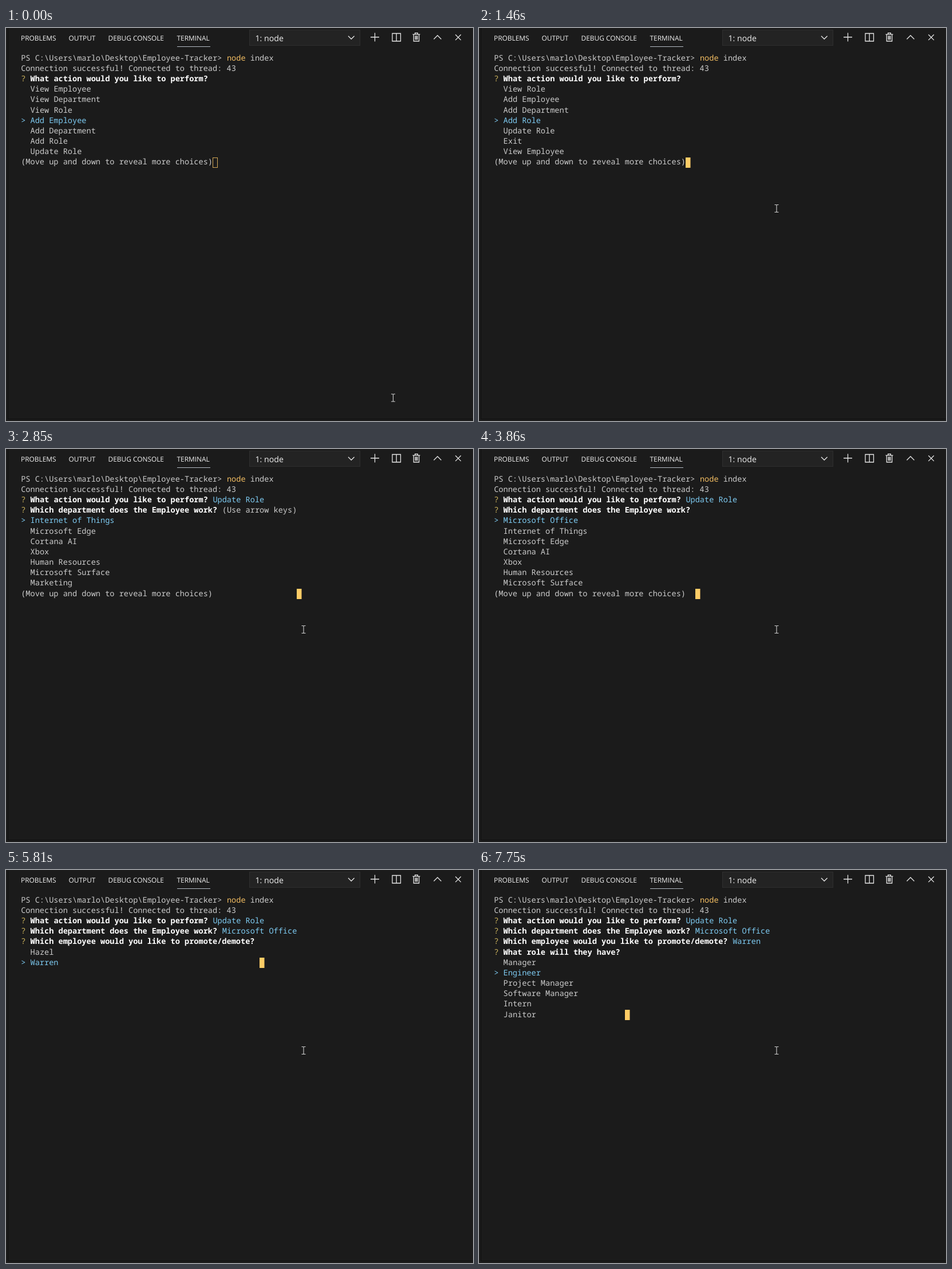
Animation of 816x686 px, one loop 8 s. Source, as an HTML page:

```html
<!DOCTYPE html>
<html lang="en">
<head>
<meta charset="utf-8">
<title>Terminal menu</title>
<style>
  html, body { margin: 0; width: 100%; height: 100%; overflow: hidden; background: #1b1b1b; }
  svg { display: block; width: 816px; height: 686px; }
  text { text-rendering: geometricPrecision; white-space: pre; }
  .tabs { font: 11.9px "Open Sans", "Noto Sans", sans-serif; fill: #f2f2f2; }
  .pick { font: 14.2px "Open Sans", "Noto Sans", sans-serif; fill: #f0f0f0; }
  .icons { fill: none; stroke: #e6e6e6; stroke-width: 1.3; }
  .term { font: 13.625px "Noto Sans Mono", "DejaVu Sans Mono", monospace; fill: #cccccc; }
  .bold { font-weight: 700; fill: #ffffff; }
  .cyan { fill: #7ecbf2; }
  .mark { fill: #cdb45c; }
  .cmd { fill: #f2bd62; }
</style>
</head>
<body>
<svg viewBox="0 0 816 686">
  <rect width="816" height="686" fill="#1b1b1b"/>
  <path d="M3.5 0V682.5H816" fill="none" stroke="#101010"/>
  <g class="tabs">
    <text x="26" y="21.5">PROBLEMS</text>
    <text x="109.5" y="21.5">OUTPUT</text>
    <text x="178.5" y="21.5">DEBUG CONSOLE</text>
    <text x="298.5" y="21.5">TERMINAL</text>
  </g>
  <path d="M299 32.5H357" stroke="#b4bcc4"/>
  <rect x="425.5" y="3.5" width="193" height="27" fill="#232323" stroke="#2e2e2e"/>
  <text class="pick" x="435.5" y="23.2">1: node</text>
  <g class="icons">
    <path d="M598 14l5.3 5.3 5.3-5.3"/>
    <path d="M637 16h15M644.5 8.5v15"/>
    <path d="M675 9.5h14.5v13.5H675zM682.2 9.5V23"/>
    <path d="M710.5 11.2h13M714.7 11V8.7h4.6V11M712.3 11.2V23h9.4V11.2M715.2 13.5v7M717 13.5v7M718.8 13.5v7"/>
    <path d="M747.5 19.5l6.5-6.5 6.5 6.5"/>
    <path d="M785.3 11.5l9.6 9.6M794.9 11.5l-9.6 9.6"/>
  </g>
  <g class="term" id="term"></g>
  <rect id="caret"/>
  <path id="mouse" d="M-3.5-6.5H-1Q0-6.5 0-5.5Q0-6.5 1-6.5H3.5M0-6V6M-3.5 6.5H-1Q0 6.5 0 5.5Q0 6.5 1 6.5H3.5" fill="none" stroke="#d0d0d0" stroke-width="1.1"/>
</svg>
<script>
const LOOP = 8000, LEFT = 26.2, TOP = 44.2, CELL = 8.175, ROW = 18.18;
const term = document.getElementById('term');
const caret = document.getElementById('caret');
const mouse = document.getElementById('mouse');

const MORE = [['', '(Move up and down to reveal more choices)']];
const ARROWS = '(Use arrow keys)';
const ACTIONS = ['View Employee', 'View Department', 'View Role', 'Add Employee',
  'Add Department', 'Add Role', 'Update Role', 'Exit'];
const UNITS = ['Internet of Things', 'Microsoft Edge', 'Cortana AI', 'Xbox',
  'Human Resources', 'Microsoft Surface', 'Marketing', 'Microsoft Office'];
const STAFF = ['Hazel', 'Warren'];
const ROLES = ['Manager', 'Engineer', 'Project Manager', 'Software Manager', 'Intern', 'Janitor'];

const head = [
  [['', 'PS C:\\Users\\marlo\\Desktop\\Employee-Tracker> '], ['cmd', 'node'], ['', ' index']],
  [['', 'Connection successful! Connected to thread: 43']]
];

const ask = (text, reply = '', style = 'cyan') =>
  [['mark', '? '], ['bold', text + ' '], [style, reply]];

const list = (items, active) => items.map((name, i) =>
  i === active ? [['cyan', '> ' + name]] : [['', '  ' + name]]);

// Seven visible entries of a wrapping list
const page = (items, first, active) =>
  [...list(Array.from({ length: 7 }, (_, i) => items[(first + i) % items.length]), active), MORE];

const q1 = (...a) => ask('What action would you like to perform?', ...a);
const q2 = (...a) => ask('Which department does the Employee work?', ...a);
const q3 = (...a) => ask('Which employee would you like to promote/demote?', ...a);
const q4 = (...a) => ask('What role will they have?', ...a);

const did1 = q1('Update Role'), did2 = q2('Microsoft Office'), did3 = q3('Warren');
const action = first => [q1(), ...page(ACTIONS, first, 3)];

// start time, lines below the header, caret column, caret row
const scenes = [
  [0, action(0), 41, 10],
  [1150, [], 87, 10],
  [1230, action(1), 41, 10],
  [1460, action(2), 41, 10],
  [2470, action(3), 41, 10],
  [2780, [did1], 0, 3],
  [2850, [did1, q2(ARROWS, ''), ...page(UNITS, 0, 0)], 59, 11],
  [3860, [did1, q2(), ...page(UNITS, 7, 0)], 43, 11],
  [5100, [did1, did2, q3(ARROWS, ''), ...list(STAFF, 0)], 67, 6],
  [5810, [did1, did2, q3(), ...list(STAFF, 1)], 51, 6],
  [6740, [did1, did2, did3, q4(ARROWS, ''), ...list(ROLES, 0)], 57, 11],
  [7750, [did1, did2, did3, q4(), ...list(ROLES, 1)], 28, 11]
];

// start time, pointer x, pointer y
const moves = [
  [0, 676.5, 645.5], [70, 640.5, 560.5], [150, 574.5, 418.5],
  [220, 530.5, 333.5], [300, 520, 315]
];

const set = (el, attrs) => {
  for (const k in attrs) el.setAttribute(k, attrs[k]);
  return el;
};

function drawLine(parts, row) {
  let col = 0;
  for (const [style, text] of parts) {
    const indent = text.length - text.trimStart().length;
    const el = document.createElementNS('http://www.w3.org/2000/svg', 'text');
    set(el, {
      class: style,
      x: LEFT + (col + indent) * CELL,
      y: Math.round(56.6 + row * ROW)
    });
    el.textContent = text.trim();
    if (el.textContent) term.append(el);
    col += text.length;
  }
}

function drawScene([, lines, col, row]) {
  term.replaceChildren();
  [...head, ...lines].forEach(drawLine);
  set(caret, { x: Math.round(LEFT + col * CELL - 0.2), y: Math.round(TOP + row * ROW) });
}

function drawCaret(focused) {
  const shift = focused ? '' : 'translate(.5 .5)';
  set(caret, {
    width: focused ? 8.5 : 8, height: focused ? 18 : 17, transform: shift,
    fill: focused ? '#ffcc66' : 'none', stroke: focused ? 'none' : '#d0a656'
  });
}

const current = (steps, t) => steps.findLast(s => s[0] <= t);
let shown;

function frame(now) {
  const t = Math.max(0, now - start) % LOOP;
  const scene = current(scenes, t);
  if (scene !== shown) drawScene(shown = scene);
  const [, x, y] = current(moves, t);
  mouse.setAttribute('transform', `translate(${x} ${y})`);
  drawCaret(t >= 300);
  requestAnimationFrame(frame);
}

const start = performance.now();
frame(start);
</script>
</body>
</html>
```
